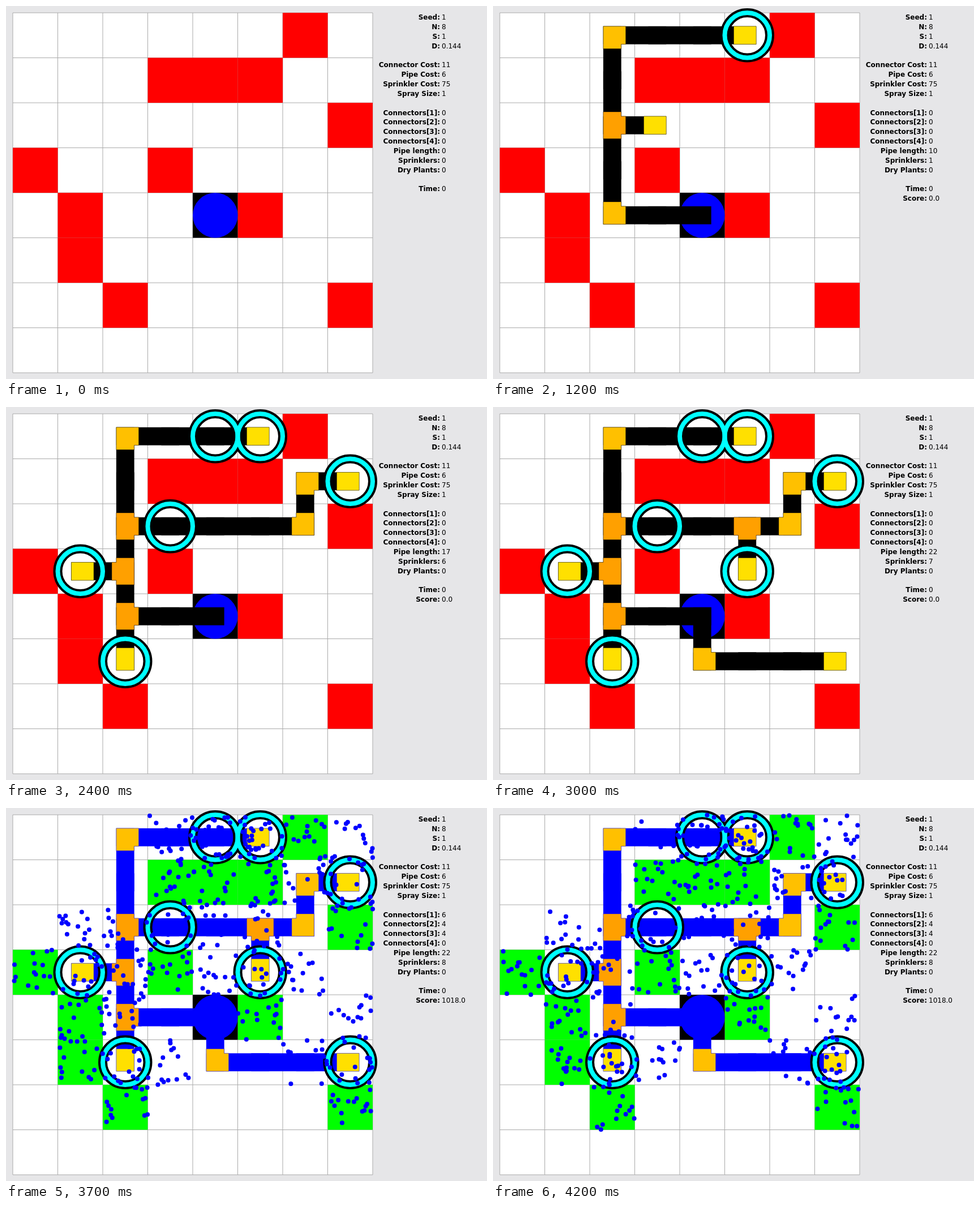
An HTML page that plays this animation: 850x659 px, repeating every 4300 ms.

```html
<!DOCTYPE html>
<html lang="en">
<head>
<meta charset="utf-8">
<title>Sprinkler layout</title>
<style>
  html, body { margin: 0; width: 100%; height: 100%; overflow: hidden; background: #e6e6e8; }
  svg { display: block; width: 850px; height: 659px; }
  text { font: 12px "DejaVu Sans", sans-serif; fill: #000; }
  .label { font-weight: bold; text-anchor: end; }
  .grid { stroke: #aaa; stroke-width: 1; }
  .joint { stroke-opacity: .6; stroke-width: .8; }
</style>
</head>
<body>
<svg id="stage" viewBox="0 0 850 659"></svg>
<script>
const stage = document.getElementById('stage');
const STEP = 100, STEPS = 43, WET = 32;
const N = 8, LEFT = 12, CELL = 79.5, SIZE = N * CELL;
const HALF = CELL * 0.2, ARM = CELL * 0.3;
const DROPS = 15;
const SOURCE = '44';
const PLANTS = '60 31 41 51 72 03 33 14 54 15 26 76'.split(' ');

// Four digits lay a pipe between two cells, two digits place a sprinkler.
const BUILD = ('4434 3424 2423 2322 2221 2120 2030 3040 4050 50 ' +
  '2232 32 2313 13 2425 25 40 3242 4252 5262 6261 6171 71 ' +
  '5253 53 4445 4555 5565 6575 75').split(' ');

const LABELS = ['Seed', 'N', 'S', 'D', '', 'Connector Cost', 'Pipe Cost', 'Sprinkler Cost',
  'Spray Size', '', 'Connectors[1]', 'Connectors[2]', 'Connectors[3]', 'Connectors[4]',
  'Pipe length', 'Sprinklers', 'Dry Plants', '', 'Time', 'Score'];

const edge = i => LEFT + i * CELL;
const mid = i => LEFT + (+i + 0.5) * CELL;
const rect = (x, y, w, h, fill) =>
  `<rect x="${x}" y="${y}" width="${w}" height="${h}" fill="${fill}"/>`;
const circle = (x, y, r, attrs) => `<circle cx="${x}" cy="${y}" r="${r}" ${attrs}/>`;
const tile = ([x, y], fill) => rect(edge(x), edge(y), CELL, CELL, fill);

function board(wet) {
  let out = rect(LEFT, LEFT, SIZE, SIZE, '#fff');
  for (let i = 0; i <= N; i++) {
    const p = edge(i);
    out += `<path class="grid" d="M${p} ${LEFT}v${SIZE}M${LEFT} ${p}h${SIZE}"/>`;
  }
  out += PLANTS.map(p => tile(p, wet ? '#0f0' : '#f00')).join('');
  return out + tile(SOURCE, '#000') + circle(mid(4), mid(4), CELL / 2, 'fill="#00f"');
}

function pipe([ax, ay, bx, by], fill) {
  const x = mid(Math.min(ax, bx)) - HALF, y = mid(Math.min(ay, by)) - HALF;
  return rect(x, y, Math.abs(bx - ax) * CELL + 2 * HALF, Math.abs(by - ay) * CELL + 2 * HALF, fill);
}

// Collects for every cell which sides (up, right, down, left) hold a pipe.
function links(pipes) {
  const map = {};
  const add = (cell, dx, dy) => {
    const side = dy < 0 ? 0 : dx > 0 ? 1 : dy > 0 ? 2 : 3;
    (map[cell] = map[cell] || [0, 0, 0, 0])[side] = 1;
  };
  for (const [ax, ay, bx, by] of pipes) {
    add(ax + ay, bx - ax, by - ay);
    add(bx + by, ax - bx, ay - by);
  }
  return map;
}

function joint([x, y], [up, right, down, left], stroke) {
  const count = up + right + down + left;
  if (count === 2 && up === down) return '';
  const w = HALF, a = ARM, pts = [[-w, -w]];
  if (up) pts.push([-w, -a], [w, -a]);
  pts.push([w, -w]);
  if (right) pts.push([a, -w], [a, w]);
  pts.push([w, w]);
  if (down) pts.push([w, a], [-w, a]);
  pts.push([-w, w]);
  if (left) pts.push([-a, w], [-a, -w]);
  const fill = ['', '#ffe000', '#ffc000', '#ffa000'][count];
  const list = pts.map(([px, py]) => `${mid(x) + px},${mid(y) + py}`).join(' ');
  return `<polygon class="joint" points="${list}" fill="${fill}" stroke="${stroke}"/>`;
}

function rings(heads) {
  const draw = (color, width) => heads.map(([x, y]) =>
    circle(mid(x), mid(y), CELL / 2, `fill="none" stroke="${color}" stroke-width="${width}"`)).join('');
  return draw('#000', 16) + draw('#0ff', 8);
}

function random(seed) {
  let s = seed * 7919 + 17;
  return () => {
    s = s + 0x6d2b79f5 | 0;
    let v = Math.imul(s ^ s >>> 15, 1 | s);
    v = v + Math.imul(v ^ v >>> 7, 61 | v) ^ v;
    return ((v ^ v >>> 14) >>> 0) / 4294967296;
  };
}

function spray(heads, seed) {
  const rnd = random(seed);
  let out = '';
  for (const [hx, hy] of heads)
    for (const [dx, dy] of [[0, 0], [0, -1], [1, 0], [0, 1], [-1, 0]]) {
      const x = +hx + dx, y = +hy + dy;
      if (x < 0 || y < 0 || x >= N || y >= N) continue;
      for (let i = 0; i < DROPS; i++)
        out += circle((LEFT + (x + rnd()) * CELL).toFixed(1),
          (LEFT + (y + rnd()) * CELL).toFixed(1), 4, 'fill="#00f"');
    }
  return out;
}

function panel(step, length, heads, wet) {
  const joints = wet ? [6, 4, 4, 0] : [0, 0, 0, 0];
  const values = [1, 8, 1, '0.144', '', 11, 6, 75, 1, '', ...joints,
    length, heads, 0, '', 0, wet ? '1018.0' : '0.0'];
  return LABELS.map((label, i) => {
    if (!label || (label === 'Score' && !step)) return '';
    const y = Math.round(24 + i * 16.86);
    return `<text class="label" x="767" y="${y}">${label}:</text>` +
      `<text x="770" y="${y}">${values[i]}</text>`;
  }).join('');
}

function draw(step) {
  const wet = step >= WET, color = wet ? '#00f' : '#000';
  const done = BUILD.slice(0, Math.max(0, step - 1));
  const pipes = done.filter(d => d.length === 4);
  const heads = done.filter(d => d.length === 2);
  const map = links(pipes);
  stage.innerHTML = board(wet) +
    pipes.map(p => pipe(p, color)).join('') +
    Object.keys(map).filter(c => c !== SOURCE).map(c => joint(c, map[c], color)).join('') +
    rings(heads) + (wet ? spray(heads, step) : '') +
    panel(step, pipes.length, heads.length, wet);
}

let shown = 0, start = null;
function tick(now) {
  if (start === null) start = now;
  const step = Math.floor((now - start) / STEP) % STEPS;
  if (step !== shown) draw(shown = step);
  requestAnimationFrame(tick);
}
draw(0);
requestAnimationFrame(tick);
</script>
</body>
</html>
```
